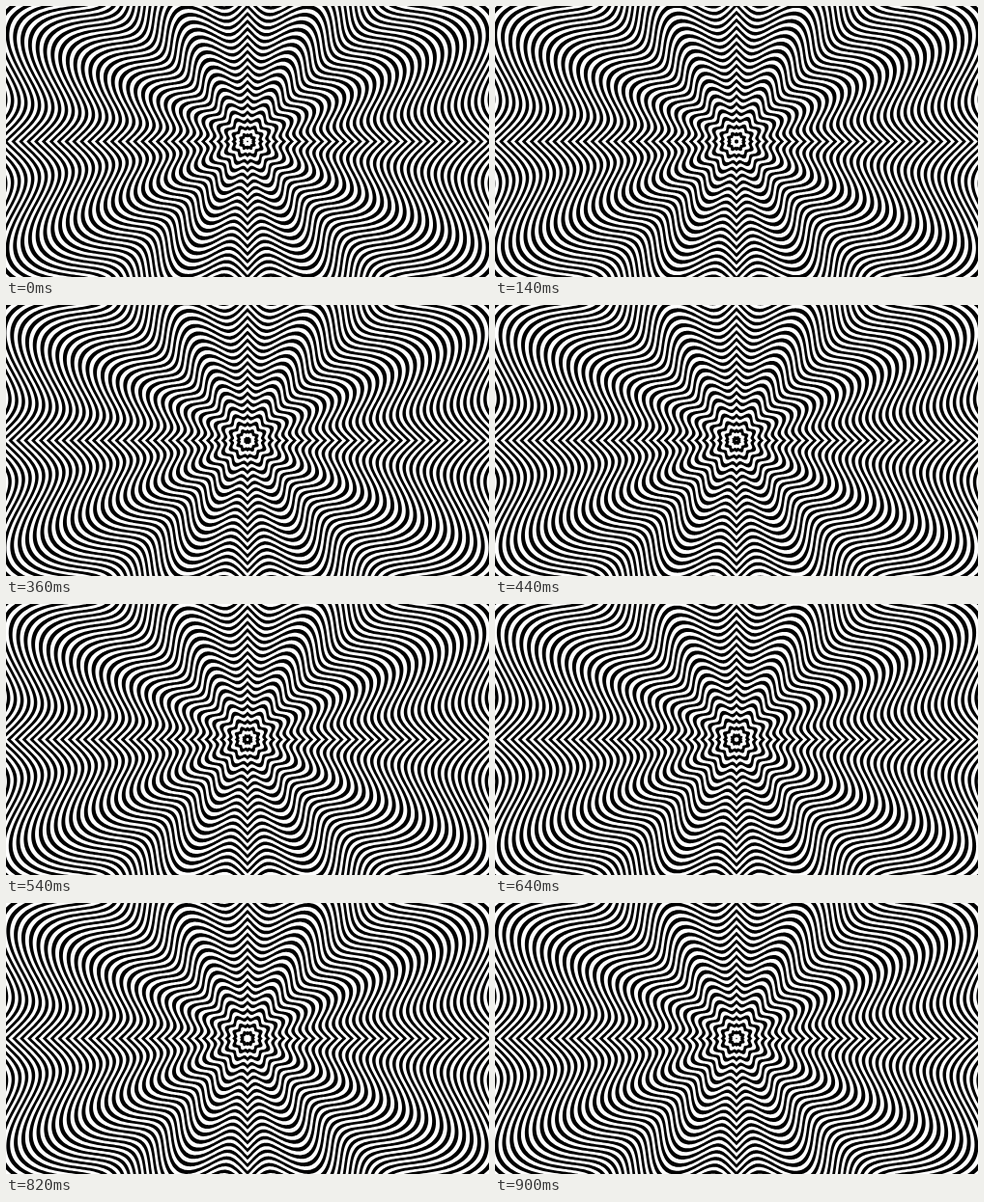
Recreate the animation shown at these times as an HTML page with a canvas. Size 500 by 281 pixels, loop 0.92 s.

```html
<!DOCTYPE html>
<html lang="en">
<head>
<meta charset="utf-8">
<title>Expanding wavy rings</title>
<style>
html, body { margin: 0; width: 100%; height: 100%; overflow: hidden; background: #fff; }
canvas { display: block; width: 500px; height: 281px; }
</style>
</head>
<body>
<canvas id="stage" width="500" height="281"></canvas>
<script>
const ctx = document.getElementById('stage').getContext('2d');
const LOOP = 920, TICK = 20, STEPS = 45, HOLD = 14;
const CX = 250, CY = 140.5, PERIOD = 7.86, START = 0.61;
const RINGS = 43, WAVE = 0.1, FREQ = 10;

// Unit outline: one waved quadrant, mirrored across both axes
function outline() {
  const path = new Path2D();
  for (let i = 0; i < 720; i++) {
    const a = i * Math.PI / 360;
    const q = Math.atan2(Math.abs(Math.sin(a)), Math.abs(Math.cos(a)));
    const r = 1 - WAVE * Math.sin(FREQ * q);
    path.lineTo(r * Math.cos(a), r * Math.sin(a));
  }
  path.closePath();
  return path;
}

const shape = outline();

function draw(phase) {
  const bands = new Path2D();
  const edge = turns => {
    const r = turns * PERIOD;
    if (r > 0) bands.addPath(shape, new DOMMatrix([r, 0, 0, r, CX, CY]));
  };
  for (let m = -2; m < RINGS; m++) {
    edge(phase + m);
    edge(phase + m + 0.5);
  }
  ctx.fillStyle = '#fff';
  ctx.fillRect(0, 0, 500, 281);
  ctx.fillStyle = '#000';
  ctx.fill(bands, 'evenodd');
}

let last = -1;
const origin = performance.now();

function frame() {
  const tick = Math.floor((performance.now() - origin) % LOOP / TICK);
  // One step of the loop lasts two ticks
  const step = tick < HOLD ? tick : tick - 1;
  if (step !== last) {
    last = step;
    draw(START + step / STEPS);
  }
  requestAnimationFrame(frame);
}
frame();
</script>
</body>
</html>
```
